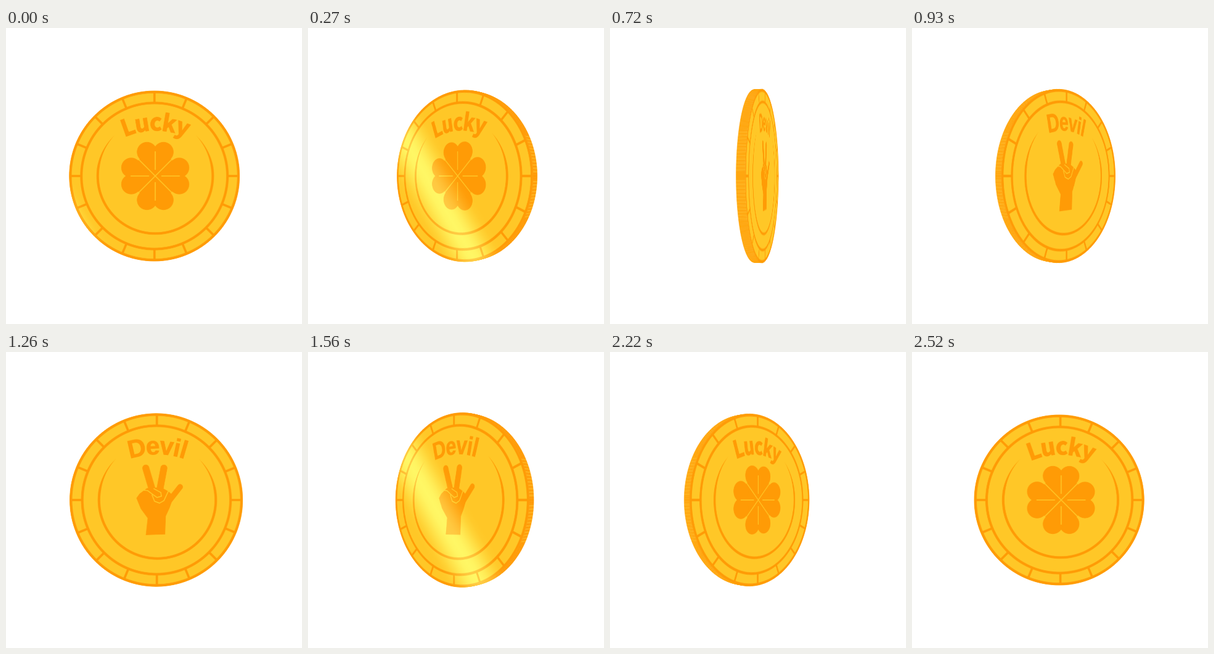
Recreate the animation shown at these times as an HTML page with a canvas. Size 480 by 480 pixels, loop 2.55 s.

```html
<!DOCTYPE html>
<html lang="en">
<head>
<meta charset="utf-8">
<title>Spinning coin</title>
<style>
html, body { margin: 0; width: 100%; height: 100%; overflow: hidden; background: #fff; }
canvas { display: block; width: 480px; height: 480px; }
</style>
</head>
<body>
<canvas id="stage" width="480" height="480"></canvas>
<script>
const LOOP = 2550, STEP = 30;
const GOLD = '#ffc727', ORANGE = '#ff9b06', LIT_RIM = '#ffa710', REED = '#ffb01a';
const AXIS_X = 240.7, AXIS_Y = 240;
const DEPTH = 720, THICK = 12.5, RADIUS = 138.5, EMBLEM_X = 1.3;
const RES = 2, HALF = 140;
const TAU = Math.PI * 2;

const stage = document.getElementById('stage').getContext('2d');
stage.imageSmoothingQuality = 'high';

function ring(g, r, width) {
  g.lineWidth = width;
  g.beginPath();
  g.arc(0, 0, r, 0, TAU);
  g.stroke();
}

function polyline(g, points, width, color) {
  g.strokeStyle = color;
  g.lineWidth = width;
  g.beginPath();
  points.forEach(([x, y]) => g.lineTo(x, y));
  g.stroke();
}

function fillShape(g, points) {
  g.beginPath();
  points.forEach(([x, y]) => g.lineTo(x, y));
  g.closePath();
  g.fill();
}

function dot(g, x, y, r) {
  g.beginPath();
  g.arc(x, y, r, 0, TAU);
  g.fill();
}

// Open ring whose two ends taper to a point
function taperedArc(g, r, width) {
  const outer = [], inner = [];
  for (let deg = -45; deg <= 225; deg += 3) {
    const a = deg * Math.PI / 180;
    const w = width * Math.min(1, Math.min(deg + 45, 225 - deg) / 36) / 2;
    outer.push([Math.cos(a) * (r + w), Math.sin(a) * (r + w)]);
    inner.unshift([Math.cos(a) * (r - w), Math.sin(a) * (r - w)]);
  }
  fillShape(g, outer.concat(inner));
}

function arcText(g, { text, font, bend, baseline, tracking, weight }) {
  g.font = font;
  g.textAlign = 'center';
  g.textBaseline = 'alphabetic';
  g.lineWidth = weight;
  let along = -g.measureText(text).width * tracking / 2;
  for (const letter of text) {
    const w = g.measureText(letter).width * tracking;
    g.save();
    g.translate(0, baseline + bend);
    g.rotate((along + w / 2) / bend);
    g.fillText(letter, 0, -bend);
    g.strokeText(letter, 0, -bend);
    g.restore();
    along += w;
  }
}

function drawClover(g) {
  for (let i = 0; i < 4; i++) {
    g.save();
    g.rotate(i * Math.PI / 2);
    fillShape(g, [[0, 0], [-26, -27], [-14, -40], [14, -40], [26, -27]]);
    dot(g, -13.5, -39, 16.3);
    dot(g, 13.5, -39, 16.3);
    g.restore();
  }
  for (let i = 0; i < 4; i++) {
    g.save();
    g.rotate(i * Math.PI / 2);
    polyline(g, [[0, -10], [0, -40]], 1.5, GOLD);
    polyline(g, [[0, 0], [29, -29]], 1.5, GOLD);
    g.restore();
  }
}

function drawHand(g) {
  fillShape(g, [[-34, -3], [-29, -10], [-17, -19], [-2, -20], [8, -19], [17, -14],
    [24, -8], [23, 2], [19, 13], [13, 26], [12, 55], [-19, 56], [-16, 29], [-27, 14]]);
  g.lineCap = g.lineJoin = 'round';
  polyline(g, [[-19, -51], [-8, -14]], 11, ORANGE);
  polyline(g, [[10, -51], [3, -14]], 11, ORANGE);
  polyline(g, [[36, -21], [18, 2]], 9, ORANGE);
  polyline(g, [[-24, -16], [-16, -15], [-8, -9], [-1, -4], [6, -6], [5, -12], [-6, -18]], 1.5, GOLD);
  polyline(g, [[-9, -8], [-5, 2], [3, 5], [10, 1], [17, -14]], 1.5, GOLD);
}

function makeFace(label, emblem) {
  const canvas = document.createElement('canvas');
  canvas.width = canvas.height = HALF * 2 * RES;
  const g = canvas.getContext('2d');
  g.scale(RES, RES);
  g.translate(HALF, HALF);
  g.fillStyle = GOLD;
  dot(g, 0, 0, RADIUS - 1);
  g.strokeStyle = ORANGE;
  ring(g, RADIUS - 2, 4);
  ring(g, 118.7, 4);
  for (let i = 0; i < 16; i++) {
    g.save();
    g.rotate(i * TAU / 16);
    polyline(g, [[118, 0], [135, 0]], 3.6, ORANGE);
    g.restore();
  }
  g.translate(EMBLEM_X, 0);
  g.fillStyle = ORANGE;
  taperedArc(g, 93.5, 4);
  arcText(g, label);
  emblem(g);
  return canvas;
}

const lucky = {
  center: 0, front: -1.6,
  face: makeFace({
    text: 'Lucky', bend: 120, baseline: -74, tracking: .95, weight: 1.4,
    font: 'bold 37px "Noto Sans CJK SC", "Noto Sans CJK JP", "Noto Sans", sans-serif'
  }, drawClover)
};
const devil = {
  center: 3.5, front: 10.1,
  face: makeFace({
    text: 'Devil', bend: 135, baseline: -73, tracking: .92, weight: .8,
    font: 'bold 40px "Liberation Sans", Arial, sans-serif'
  }, drawHand)
};

function project(x, y, plane, c, s) {
  const k = DEPTH / (DEPTH - x * s - plane * c);
  return [AXIS_X + (x * c - plane * s) * k, AXIS_Y + y * k];
}

function drawRim({ center, front }, c, s) {
  const count = 360;
  const back = front - THICK;
  const base = s < 0 ? LIT_RIM : ORANGE;
  const corner = (i, plane) => {
    const a = i * TAU / count;
    return project(center + Math.cos(a) * (RADIUS - .3), Math.sin(a) * (RADIUS - .3), plane, c, s);
  };
  stage.lineWidth = .6;
  for (let i = 0; i < count; i++) {
    const height = Math.abs(Math.sin(i * TAU / count)) * RADIUS;
    const reeded = i % 2 && height > 7 && height < 62;
    stage.fillStyle = stage.strokeStyle = reeded ? REED : base;
    fillShape(stage, [corner(i, front), corner(i + 1, front), corner(i + 1, back), corner(i, back)]);
    stage.stroke();
  }
}

// The turn is about a vertical axis, so each column of the face maps to one screen column
function drawFace({ face, center, front }, c, s) {
  const localX = px => {
    const X = px - AXIS_X;
    return (X * (DEPTH - front * c) + DEPTH * front * s) / (DEPTH * c + X * s);
  };
  const left = Math.floor(project(center - RADIUS, 0, front, c, s)[0]);
  const right = Math.ceil(project(center + RADIUS, 0, front, c, s)[0]);
  for (let px = left; px < right; px++) {
    const from = Math.max(-HALF, localX(px) - center);
    const to = Math.min(HALF, localX(px + 1) - center);
    if (to <= from) continue;
    const k = DEPTH / (DEPTH - (center + (from + to) / 2) * s - front * c);
    stage.drawImage(face, (from + HALF) * RES, 0, (to - from) * RES, HALF * 2 * RES,
      px, AXIS_Y - HALF * k, 1, HALF * 2 * k);
  }
}

function drawShine(time) {
  const pos = -165 + .455 * (time % (LOOP / 2));
  const nx = Math.cos(Math.PI / 6), ny = -.5, reach = 48;
  const at = d => [240 + nx * d, 240 + ny * d];
  const band = stage.createLinearGradient(...at(pos - reach), ...at(pos + reach));
  for (let i = 0; i <= 12; i++) {
    const glow = Math.sin(i / 12 * Math.PI) ** 2;
    band.addColorStop(i / 12, `rgb(0,${Math.round(48 * glow)},${Math.round(62 * glow)})`);
  }
  stage.globalCompositeOperation = 'lighter';
  stage.fillStyle = band;
  stage.fillRect(0, 0, 480, 480);
  stage.globalCompositeOperation = 'source-over';
}

function render(time) {
  const turn = time / LOOP * TAU;
  const heads = Math.cos(turn) > 0;
  const side = heads ? lucky : devil;
  const c = Math.abs(Math.cos(turn));
  const s = heads ? Math.sin(turn) : -Math.sin(turn);
  stage.fillStyle = '#fff';
  stage.fillRect(0, 0, 480, 480);
  drawRim(side, c, s);
  if (c * DEPTH > side.front) drawFace(side, c, s);
  drawShine(time);
}

const start = performance.now();
function tick() {
  const time = (performance.now() - start) % LOOP;
  render(Math.floor(time / STEP) * STEP);
  requestAnimationFrame(tick);
}
tick();
</script>
</body>
</html>
```
